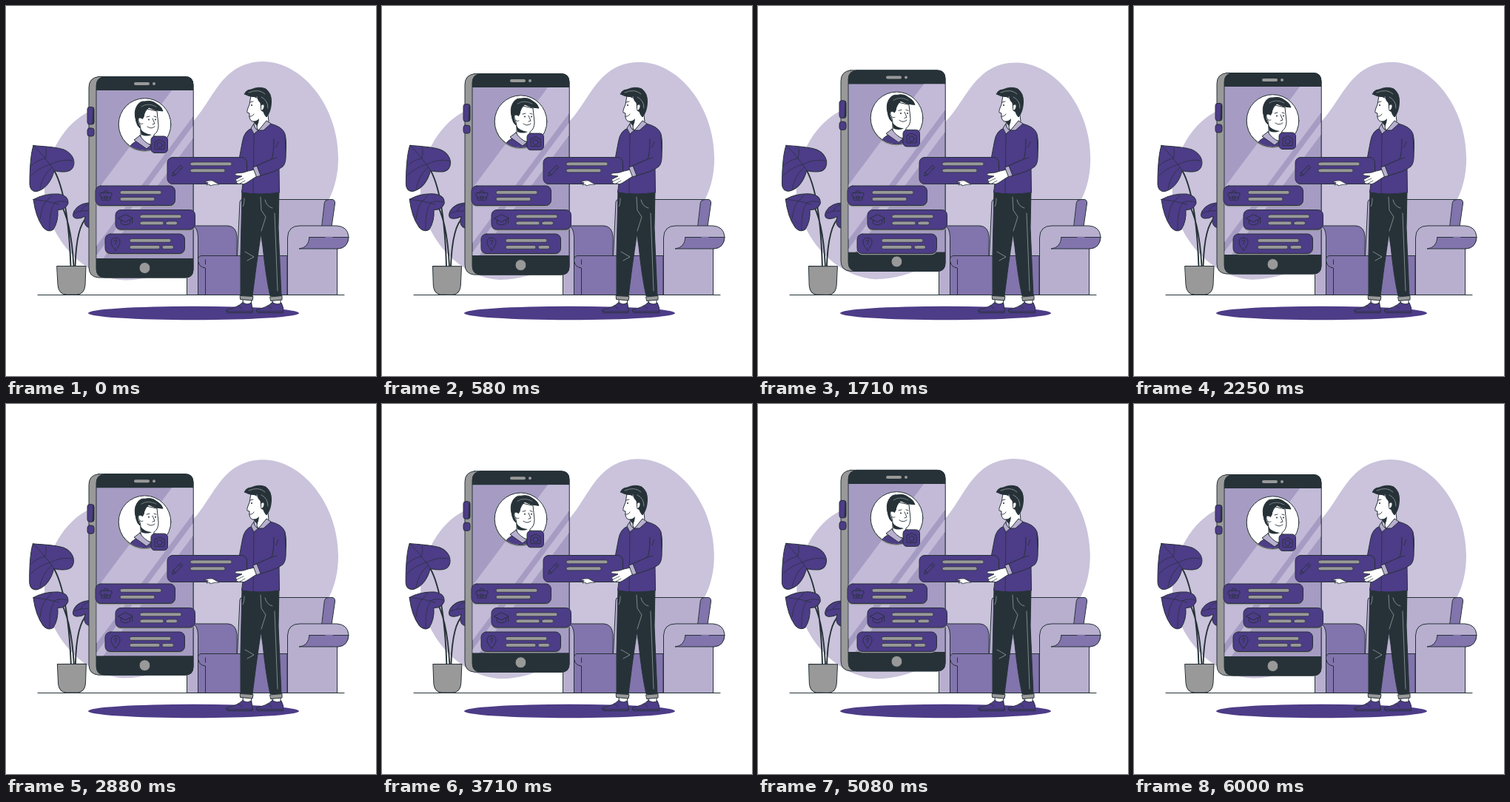
Animation of 500 by 500 pixels, one loop 6.04 s. Source, as an HTML page:

```html
<!DOCTYPE html>
<html>
<head>
<meta charset="utf-8">
<style>
html, body { margin: 0; height: 100%; overflow: hidden; background: #fff }
svg { display: block; width: 100vw; height: 100vh; stroke-linecap: round; stroke-linejoin: round }
.p { fill: #4d3c87 } .d { fill: #263238 } .g { fill: #999 } .w { fill: #fff }
.l { fill: #b8afcf } .m { fill: #8274ac }
.s { stroke: #263238 }
.n { fill: none; stroke: #263238 }
.t { fill: none; stroke: #fff; stroke-width: .6 }
.b { fill: #999; stroke: #263238; stroke-width: .7 }
</style>
</head>
<body>
<svg viewBox="0 0 500 500">
  <path id="blob" fill="#cac3db" d="M347 75C400 75 449 135 449 205C449 290 380 330 290 335C240 340 212 370.5 160 370.5C105 368 52 310 52 248C53 200 80 158 112 143C150 128 215 192 250 159C281 128 290 76 347 75Z"/>
  <ellipse class="p" cx="253.500" cy="415" rx="142.500" ry="9.300"/>
  <path class="n" d="M43 390.500H457"/>

  <g id="plant">
    <path class="n" stroke-width="1.900" d="M65 222Q84 256 87.500 352M71 263Q88 287 91.500 352M110 285Q95 297 93.500 352"/>
    <path class="p s" d="M37 188.500C50 190 66 190 78 194C90 199 95 210 90 219C86 225 76 225 65 222.500C62 236 54 246 45 249.500C37 253 32 248 32 240C32 220 33.500 199 37 188.500Z"/>
    <path class="p s" d="M37 261.500Q52 253 71 254Q85 256 84 267Q80 276 70 275.500Q71 291 64 302Q57 307 50 299Q40 285 37 261.500Z"/>
    <path class="p s" d="M120 266Q100 264 92 277Q88 286 95 287Q101 288 107 284Q103 297 113 300L120 300Z"/>
    <path class="n" stroke-width=".7" d="M37 188.500Q52 203 65 222M53 206Q56 198 54 192M60 214Q76 206 90 209M53 206Q42 208 33 217M60 214Q45 218 34 229M62 218Q49 229 46 247M37 261.500Q56 263 72 268M54 264Q59 260 62 255M65 266Q73 262 83 265M54 264Q48 271 46 288M65 267Q58 279 59 303M92 280Q103 275 118 277M101 277Q106 268 115 267"/>
    <path class="g s" d="M69 351.500H108L107 377Q106 390 95 390H82Q71 390 70 377Z"/>
  </g>

  <g class="s">
    <path class="l" d="M312.500 340L316 265Q316 261.500 320 261.500H437L440 340Z"/>
    <path class="m" d="M430.500 265Q431.500 261.500 436 261.500H441Q445 262 444.500 267L440 298H427Z"/>
    <path class="m" d="M252 297H300Q311 298 312 311V345H252Z"/>
    <path class="l" d="M244.500 390V311Q245 298 252 297Q259 299 259.500 312V390Z"/>
    <path class="m" d="M259.500 390V342Q260 337.500 265 337.500H380V390Z"/>
    <path fill="none" d="M260 346Q261 353 269.500 354V390M269.500 349V343"/>
    <path class="l" d="M380.500 390V313Q381 297 397 297H447Q462 298 463 312Q462 327 447.500 328V390Z"/>
    <path class="m" d="M410 312.500H463Q462 327 449 328H396Q409 327 410 312.500Z"/>
    <path stroke="#8274ac" stroke-width="1.400" fill="none" d="M432 312.500H441"/>
  </g>

  <g id="phone">
    <path class="g s" d="M125 95.500H242Q253 95.500 253 107V356Q253 367 242 367H125Q112 366 112 353V110Q112 97 125 95.500Z"/>
    <rect class="p s" x="110" y="136.500" width="9" height="23.500" rx="3"/>
    <rect class="p s" x="110" y="165" width="9" height="11" rx="3"/>
    <path class="d" d="M117.500 137Q119 138 119 141V157Q118 160 116.500 160Z"/>
    <path class="d s" d="M134 95.500H242Q253 95.500 253 107V356Q253 367 242 367H134Q122 367 122 355V108Q122 96 134 95.500Z"/>
    <path fill="#a69cc3" d="M122.500 114H252.500V341H122.500Z"/>
    <path fill="#c2bad7" d="M224 114H252.500V149.500L122.500 324V250ZM252.500 162V179L131.500 341H122.500V336.500Z"/>
    <rect class="g" x="173" y="103" width="21" height="4" rx="2"/>
    <circle class="g" cx="200" cy="105" r="2"/>
    <circle class="g s" cx="187.500" cy="354" r="7.500"/>
    <circle class="g" cx="187" cy="161.500" r="35.500"/>
    <circle class="w s" cx="187.500" cy="160" r="35.300"/>
    <clipPath id="disc"><circle cx="187.500" cy="160" r="35"/></clipPath>
    <g clip-path="url(#disc)">
      <path class="p s" d="M164 196Q168 185 180 181L205 178L218 200H164Z"/>
      <path class="w s" d="M179 150L182 166V180Q188 189 197 187L200 174Q206 170 206 161L204 142L186 138Z"/>
      <path class="d" d="M181 165Q186 173 197 174Q190 177 183 174Z"/>
      <path class="l s" d="M181 175L173 181L190 193L196 188Q186 184 181 175Z"/>
    </g>
    <path class="d s" d="M176 156Q172 143 177 135Q181 128 188 129Q197 127 203 132L206 134Q210 136 212 142Q202 142 193 137Q187 142 186 150L184 153Q179 150 178 155L181 165Q177 162 176 156Z"/>
    <path class="t" stroke-opacity=".6" d="M183 136Q192 130 203 136"/>
    <path class="w s" stroke-width=".8" d="M184 152Q178 149 179 155Q181 161 185 159"/>
    <path class="n" stroke-width=".9" d="M190 150L194 149M200 149L203 150M198 152L201 159L198 160M191 163Q196 167 201 163"/>
    <circle class="d" cx="193" cy="153.500" r="1"/><circle class="d" cx="202" cy="153.500" r="1"/>
    <rect class="p s" x="196" y="176" width="22.500" height="22.500" rx="5"/>
    <path class="n" stroke-width=".9" d="M202 183H204L205.500 181H209.500L211 183H213Q214 183 214 184V192.500Q214 193.500 213 193.500H202Q201 193.500 201 192.500V184Q201 183 202 183Z"/>
    <circle class="n" stroke-width=".9" cx="207.500" cy="188" r="3.500"/>
  </g>

  <g id="cards"></g>

  <g>
    <path class="w s" d="M320 392H331L332 404H321ZM360 393H371L371 405H361Z"/>
    <path class="p s" d="M320 400.500Q326 405 331 401Q334 408 333 414.500H300Q296 412.500 299 410Q312 408 320 400.500ZM360 400.500Q367 405 372 401Q376 408 374.500 414.500H340Q337 412.500 339 410Q352 408 360 400.500Z"/>
    <path class="n" stroke-width=".8" d="M298 412.500H333M339 412.500H374M315 406L319 409M355 406L359 409"/>
    <path class="d s" d="M319 250L317 336V392H333Q338 350 344.500 308L347 325Q351 365 357 392H372L368 300L369 250Z"/>
    <path class="g s" d="M316.500 391.500L334 392.500L333 398L317 396.500ZM357 393L373 391.500V397L358 398.500Z"/>
    <path class="t" stroke-opacity=".7" d="M344 258L345 276L351 285L345 304M350 262Q352 271 360 273M322 260Q322 268 320 271M323 332L335 339L326 344M363 280L367 385"/>
    <path class="w s" d="M331 121L329 133Q325 142 326 144L329 145Q328 154 333 156Q338 157 341 154L339 164L341 170L355 156L352 130Z"/>
    <path class="d" d="M334 156Q339 156 342 152L341 158Q339 160 339 162Z"/>
    <path class="d s" d="M322.500 119Q324 113.500 331 113Q342 108 351 112Q359 118 358.500 130Q358 143 352 150Q349 147 348 143L345 141L344 131Q340 128 340 122Q331 124 322.500 119Z"/>
    <path class="t" stroke-opacity=".7" d="M328 117Q342 111 350 119M345 123Q354 127 354 138"/>
    <path class="w s" stroke-width=".8" d="M345 134Q349 131 349 136Q348 141 345 141"/>
    <path class="n" stroke-width=".9" d="M330 130L334 129M329 149Q333 150 335 146"/>
    <circle class="d" cx="332" cy="134" r="1"/>
    <path class="p s" d="M333 165Q322 168 319.500 183L315 207L320 240L318.500 252Q344 256 369.500 252L369 220L377 207Q380 185 377 173Q374 163 357 159L343 168Z"/>
    <path class="l s" d="M335 159L331 165L335 173L343 166L352 155L358 159L348 168L341 168Q335 166 335 159Z"/>
    <path class="n" stroke-width=".8" d="M335 173L334 254"/>
  </g>

  <g id="held"></g>

  <path class="w s" stroke-width=".8" d="M268 238Q274 235 279 236L288 241Q282 241 279 242L276 243L275 241L271 242L273 239Z"/>
  <path class="w s" stroke-width=".9" d="M336 221Q326 223 321 225L311 226Q308 228 311 229L319 230L311 234Q309 236 312 237L311 239Q314 241 317 240Q321 242 325 239L339 230Z"/>
  <path class="n" stroke-width=".7" d="M312 237L321 233M316 240L323 236"/>
  <path class="p s" d="M362 180Q362 200 359 207L336 217L341 230Q365 224 374 217Q379 212 378 198L377 175"/>
  <path class="l s" d="M334 218L339 216L344 229L339 231Z"/>
  <path class="n" stroke-width=".8" d="M359 207L366 205M368 183L365 191"/>
</svg>
<script>
const $ = id => document.getElementById(id);

const icons = {
  bag: 'M-6 -4H6Q8 -4 8 -2Q8 2 6 2V5Q6 6 5 6H-5Q-6 6 -6 5V2Q-8 2 -8 -2Q-8 -4 -6 -4ZM-3 -4Q-3 -7 0 -7Q3 -7 3 -4M-6 2Q-4 3 -2 3M6 2Q4 3 2 3M-1.500 1H1.500V4H-1.500Z',
  cap: 'M-10 -2L0 -7L10 -2L0 3ZM-6 0V5Q0 9 6 5V0M9 -2V5',
  pin: 'M0 9Q-6 2 -6 -2Q-6 -8 0 -8Q6 -8 6 -2Q6 2 0 9ZM-2 -3Q-1 -6 1 -5Q3 -3 0 -1V1',
  pencil: 'M-7 7L-6 2.500L3.500 -7Q6.500 -6 6.500 -4L-3 5.500ZM-6 2.500L-3 5.500M1.500 -5L4.500 -2'
};

// Each bar is [x, y, width] relative to the card corner.
function card(x, y, h, icon, ix, bars) {
  const box = (dy, look) =>
    `<rect class="${look}" y="${dy}" width="107.500" height="${h}" rx="7"/>`;
  const lines = bars.map(([bx, by, w]) =>
    `<rect class="b" x="${bx}" y="${by}" width="${w}" height="4.800" rx="2.400"/>`).join('');
  return `<g transform="translate(${x} ${y})">${h < 30 ? box(1.8, 'g') : ''}${box(0, 'p s')}${lines}
    <path class="n" stroke-width=".9" transform="translate(${ix} ${h / 2})" d="${icons[icon]}"/></g>`;
}

$('cards').innerHTML =
  card(121, 243, 26.5, 'bag', 14, [[33, 6.5, 56], [33, 15.5, 47]]) +
  card(148, 275.5, 26.5, 'cap', 13.5, [[33, 6.5, 56], [33, 15.5, 32], [68, 15.5, 15.5]]) +
  card(134, 308, 26.5, 'pin', 14, [[33, 6.5, 56], [33, 15.5, 41], [77, 15.5, 15.5]]);
$('held').innerHTML =
  card(218, 204.5, 36, 'pencil', 14, [[31, 6.5, 56], [31, 15.5, 47]]);

const wind = turns => Math.asin(Math.sin(turns * 2 * Math.PI)) * 2 / Math.PI;
const rise = turns => 1 - Math.abs(1 - 2 * (turns % 1));

function draw(now) {
  // The motion advances at 24 steps per second.
  const t = Math.floor((now % 6040 + 4) * .024) / 24;
  $('phone').setAttribute('transform', `translate(0 ${-10 * rise(t / 3)})`);
  $('blob').setAttribute('transform', `rotate(${wind(t / 6)} 250 223)`);
  $('plant').setAttribute('transform', `rotate(${wind(t / 1.5)} 76 289)`);
}

let start;
function tick(now) {
  start ??= now;
  draw(now - start);
  requestAnimationFrame(tick);
}
draw(0);
requestAnimationFrame(tick);
</script>
</body>
</html>
```
